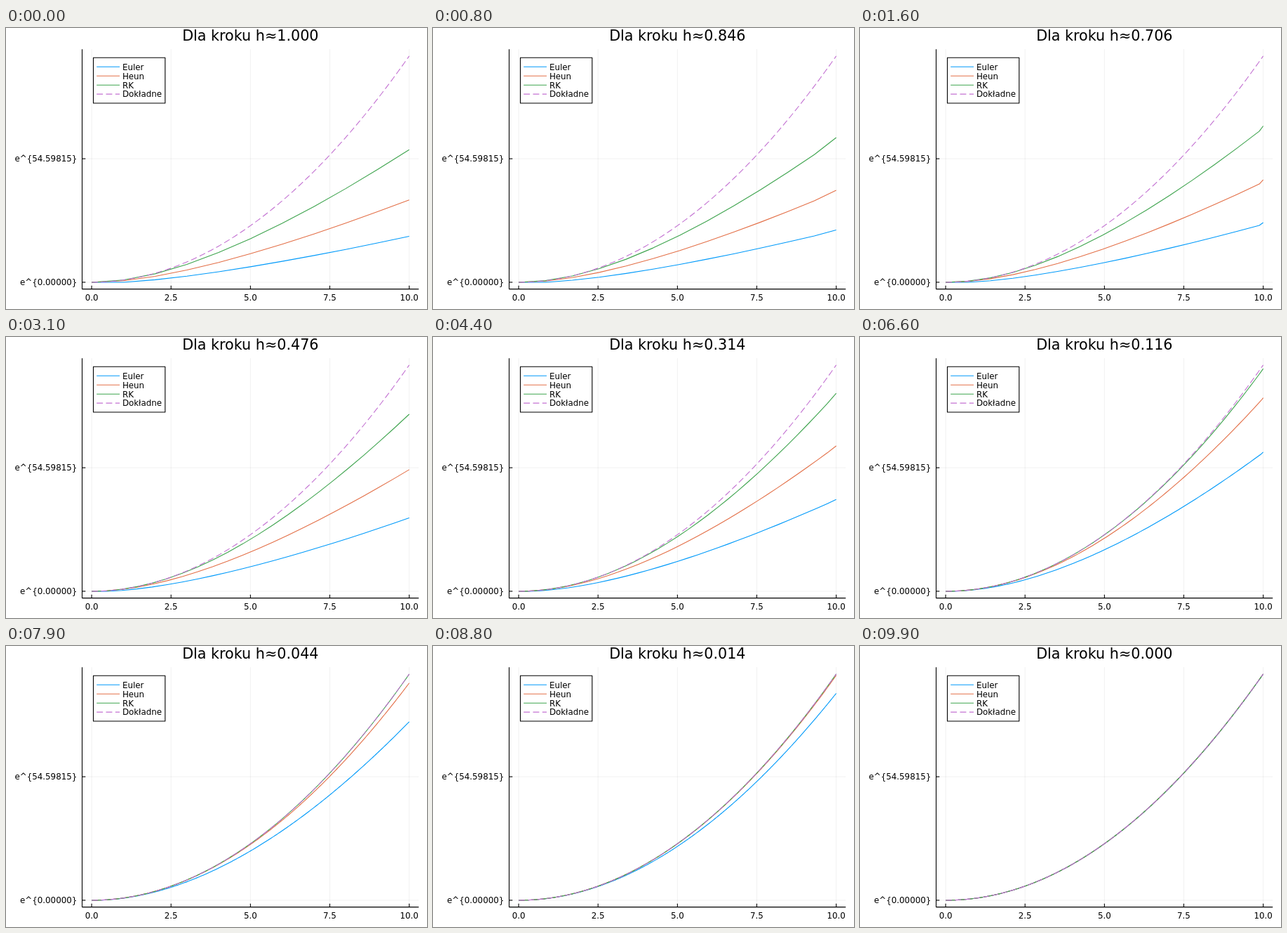
These frames come from a looping animation (600 by 400 pixels, 10 s). An HTML page with a canvas:

```html
<!DOCTYPE html>
<html lang="pl">
<head>
<meta charset="utf-8">
<title>Dla kroku h</title>
<style>
html, body { margin: 0; width: 100%; height: 100%; overflow: hidden; background: #fff; }
canvas { display: block; }
</style>
</head>
<body>
<canvas id="stage" width="600" height="400"></canvas>
<script>
const ctx = document.getElementById("stage").getContext("2d");
const STEPS = 100, STEP_MS = 100, END = 10;
const BOX = { left: 108.5, right: 588.2, top: 30.2, bottom: 371.6 };
const DASH = [8.9, 4.4];
const FONT = '"DejaVu Sans", Verdana, sans-serif';

// Axis limits are widened by 3% on each side.
const px = x => BOX.left + (x + 0.3) / 10.6 * (BOX.right - BOX.left);
const py = v => BOX.bottom - (v + 3) / 106 * (BOX.bottom - BOX.top);

// Each method gives growth - 1 for one step of y' = 2xy.
const euler = (x, h) => 2 * x * h;
const midpoint = (x, h) => h * (2 * x + h) * (1 + h * x);
function rungeKutta(x, h) {
  const m = 2 * x + h;
  const k1 = 2 * x;
  const k2 = m * (1 + h * k1 / 2);
  const k3 = m * (1 + h * k2 / 2);
  const k4 = 2 * (x + h) * (1 + h * k3);
  return h * (k1 + 2 * k2 + 2 * k3 + k4) / 6;
}

const SERIES = [
  { name: "Euler", color: "#009afa", method: euler },
  { name: "Heun", color: "#e36f47", method: midpoint },
  { name: "RK", color: "#3ea44e", method: rungeKutta },
  { name: "Dokładne", color: "#c371d2", dash: DASH }
];

// Logarithm of the numeric solution, thinned to a drawable number of points.
function solve(method, h) {
  const points = [[0, 0]];
  let x = 0, log = 0, kept = 0;
  for (let n = 0; END - x > 1e-9; n++) {
    const next = Math.min((n + 1) * h, END);
    log += Math.log1p(method(x, next - x));
    x = next;
    if (x - kept >= 0.02 || END - x < 1e-9) {
      points.push([x, log]);
      kept = x;
    }
  }
  return points;
}

const exact = Array.from({ length: 201 }, (_, i) => [i / 20, (i / 20) ** 2]);

function line(points, color, width, dash = []) {
  ctx.beginPath();
  points.forEach(([x, y]) => ctx.lineTo(x, y));
  ctx.strokeStyle = color;
  ctx.lineWidth = width;
  ctx.lineJoin = "round";
  ctx.setLineDash(dash);
  ctx.stroke();
  ctx.setLineDash([]);
}

function text(str, x, y, align, size = 11.85) {
  ctx.font = size + "px " + FONT;
  ctx.textAlign = align;
  ctx.fillStyle = "#000";
  ctx.fillText(str, x, y);
}

function drawAxes() {
  const { left, right, top, bottom } = BOX;
  const grid = "rgba(0,0,0,0.1)";
  const xTicks = [0, 2.5, 5, 7.5, 10], yTicks = [0, Math.exp(4)];
  for (const t of xTicks) line([[px(t), bottom], [px(t), top]], grid, 0.6);
  for (const t of yTicks) line([[left, py(t)], [right, py(t)]], grid, 0.6);
  line([[left, top], [left, bottom], [right, bottom]], "#000", 1.1);
  for (const t of xTicks) {
    line([[px(t), bottom], [px(t), bottom - 4.8]], "#000", 1.1);
    text(t.toFixed(1), px(t), 387.8, "center");
  }
  for (const t of yTicks) {
    line([[left, py(t)], [left + 4.8, py(t)]], "#000", 1.1);
    text("e^{" + t.toFixed(5) + "}", 101.3, py(t) + 4.4, "right");
  }
}

function drawLegend() {
  ctx.fillStyle = "#fff";
  ctx.fillRect(124.5, 42.3, 102.3, 64.7);
  ctx.strokeStyle = "#000";
  ctx.lineWidth = 1.1;
  ctx.strokeRect(124.5, 42.3, 102.3, 64.7);
  SERIES.forEach((s, i) => {
    const y = 55.3 + i * 12.95;
    line([[129.2, y], [162, y]], s.color, 1.1, s.dash);
    text(s.name, 165.9, y + 4.3, "left");
  });
}

function draw(step) {
  const h = (1 - step / STEPS) ** 2;
  ctx.fillStyle = "#fff";
  ctx.fillRect(0, 0, 600, 400);
  drawAxes();
  for (const s of SERIES) {
    const points = s.method ? solve(s.method, h) : exact;
    line(points.map(([x, v]) => [px(x), py(v)]), s.color, 1.1, s.dash);
  }
  drawLegend();
  text("Dla kroku h≈" + h.toFixed(3), 348.3, 18, "center", 20.7);
}

let shown = -1;
function tick() {
  const step = Math.floor(performance.now() / STEP_MS) % STEPS;
  if (step !== shown) draw(shown = step);
  requestAnimationFrame(tick);
}
tick();
</script>
</body>
</html>
```
